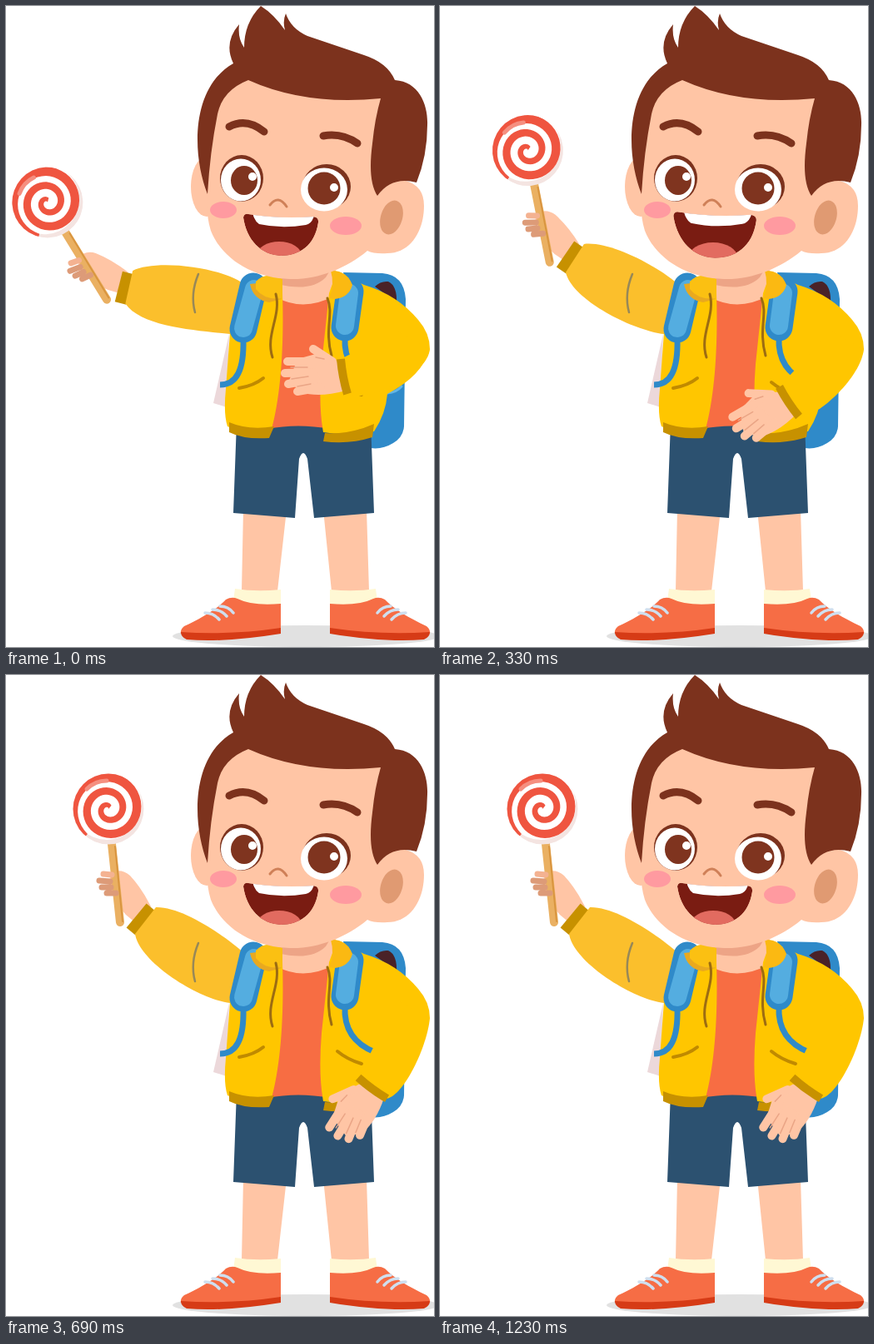
An HTML page for the animation above (1.8 s loop, 514 by 770 pixels).

```html
<!DOCTYPE html>
<html lang="en">
<head>
<meta charset="utf-8">
<title>Boy with a lollipop</title>
<style>
  html, body { margin: 0; height: 100%; overflow: hidden; background: #fff; }
  svg { display: block; width: 100%; height: 100%; }
  .line { fill: none; stroke-linecap: round; stroke-linejoin: round; }
  .flat { stroke-linecap: butt; }
  .skin { fill: #ffc5a5; }
  .hair { fill: #7c321d; }
  .coat { fill: #ffc600; }
  .trim { fill: #c79100; }
  .blue { fill: #2f8ac9; }
</style>
</head>
<body>
<svg viewBox="0 0 514 770">
  <defs>
    <clipPath id="mouthClip"><path id="lips" d="M285 254Q286 249 291 250Q330 256 369 253Q376 254 375 260C371 288 352 300 330 300C306 299 289 281 285 254Z"/></clipPath>
    <clipPath id="candyClip"><circle cx="123" cy="161" r="42.5"/></clipPath>
    <g id="shoe">
      <path fill="#fff8d4" d="M275 700Q300 704 330 701V722H272Z"/>
      <path fill="#f66d45" d="M330 718V751Q270 760 210 754Q209 749 214 745C235 735 254 724 264 713Q271 709 278 712Q296 721 330 718Z"/>
      <path fill="#d63b16" d="M210 752Q270 756 330 747V754Q262 765 217 761Q210 758 210 752Z"/>
      <path class="line" stroke="#cfdfef" stroke-width="3.5" d="M239 729Q249 729 256 737M248 725Q258 725 265 733M257 721Q267 721 273 729"/>
    </g>
  </defs>

  <ellipse cx="360" cy="757" rx="160" ry="13" fill="#e1e1e1"/>

  <!-- backpack -->
  <path class="blue" d="M405 320L452 321Q478 323 480 352L478 505Q477 518 465 525Q452 533 438 531L425 400Z"/>
  <path fill="#4a2228" d="M443 337Q450 330 459 331Q470 336 469 357Q456 346 443 337Z"/>
  <path class="line" stroke="#62b5e5" stroke-width="3" d="M458 465Q469 464 475 457"/>
  <path fill="#ecd8da" d="M268 394L249 477L265 482Z"/>

  <!-- legs -->
  <path class="skin" d="M285 605L283 703H326L337 605ZM381 605L391 703H436L433 605Z"/>
  <use href="#shoe"/>
  <use href="#shoe" transform="matrix(-1 0 0 1 719 0)"/>
  <path fill="#2c5170" d="M277 500H438L442 609L370 615L362 544Q357 530 352 544L347 615L273 609Z"/>

  <!-- raised arm -->
  <g id="arm">
    <path class="skin" d="M174 278Q163 256 149 241Q139 232 127 237Q121 250 128 263Q137 284 150 293L158 300Z"/>
    <path class="line" stroke="#eab062" stroke-width="10" d="M127 203L137 297"/>
    <path class="line" stroke="#d9953f" stroke-width="2" d="M131 206L140 296"/>
    <path class="line" stroke="#f4b291" stroke-width="7" d="M117 239L127 240"/>
    <path class="line" stroke="#dd9b78" stroke-width="7" d="M112 247L125 248M115 255L126 255M121 262L132 262"/>
    <g clip-path="url(#candyClip)">
      <circle cx="123" cy="161" r="43" fill="#f4e4e1"/>
      <circle cx="121" cy="156" r="42" fill="#fff"/>
      <path id="swirl" fill="#ef5540"/>
      <path class="line" stroke="#f58f80" stroke-width="5" d="M97 137Q107 127 121 127"/>
    </g>
    <path class="line flat" stroke="#c79100" stroke-width="14" d="M174 279L150 308"/>
  </g>
  <path id="sleeve" fill="#fbbf2c"/>
  <path class="line" stroke="#978858" stroke-width="2.5" d="M231 322Q221 346 227 368"/>

  <!-- torso -->
  <path class="skin" d="M316 316H396V352Q358 370 322 354Z"/>
  <path fill="#eda486" d="M318 326Q355 330 390 316L384 326Q366 344 326 334Z"/>
  <path fill="#f76d43" d="M325 350Q358 368 394 348L390 508Q350 501 314 508Z"/>
  <path class="coat" d="M298 326L332 345C334 410 330 470 318 512Q290 516 266 505Q261 490 264 460L269 392L286 334Z"/>
  <path class="trim" d="M268 500Q291 510 322 505L316 519Q286 521 268 512Z"/>
  <path class="coat" d="M388 345L397 320L430 335Q470 347 495 377Q509 393 509 412Q500 444 458 466Q456 490 442 511Q410 517 381 512Q375 480 379 430Z"/>
  <path class="trim" d="M383 513Q413 515 442 502L440 518Q412 527 381 523Z"/>
  <path class="line" stroke="#c08a00" stroke-width="4" d="M280 459Q298 456 309 447M398 452Q410 462 427 467"/>

  <!-- straps -->
  <path class="line" stroke="#2f8ac9" stroke-width="33" d="M297 337L285 388M413 343L407 386"/>
  <path class="line" stroke="#54ade0" stroke-width="22" d="M298 340L285 387M412 345L407 384"/>
  <path class="line flat" stroke="#2f8ac9" stroke-width="7" d="M285 400C286 437 277 455 257 455M407 398Q405 438 443 453"/>
  <path fill="#e9a91f" d="M293 334Q297 353 316 356L331 352L310 332Z"/>
  <path fill="#fbc012" d="M300 331Q312 318 332 328V351Q311 354 300 340Z"/>
  <path fill="#fbb912" d="M388 351Q395 335 390 318Q409 317 416 335Q412 350 395 352Z"/>
  <path class="line" stroke="#9c6c12" stroke-width="3" d="M324 346C331 372 311 395 320 422M386 351C394 370 382 388 391 420"/>

  <!-- head -->
  <ellipse class="skin" cx="241" cy="217" rx="19" ry="36"/>
  <path class="skin" d="M502 240C502 270 486 297 458 297Q442 298 434 294C408 316 373 329 341 328C298 327 260 305 246 270Q238 245 243 205L250 120L290 82L455 106L446 222Q462 207 480 210Q502 216 502 240Z"/>
  <ellipse cx="463" cy="254" rx="13" ry="21" fill="#e09a72" transform="rotate(17 463 254)"/>
  <path class="hair" d="M242 226C223 178 222 98 273 69Q261 44 280 22Q278 39 286 50Q286 20 306 0Q322 10 335 29Q332 18 336 9Q342 27 362 36L430 59Q458 68 467 89C497 91 507 120 506 143Q506 180 493 212Q463 204 446 228Q434 210 440 165Q443 135 450 111Q360 120 291 89Q260 101 254 130Q245 175 242 226Z"/>
  <path class="line" stroke="#7c321d" stroke-width="9" d="M268 145Q289 134 310 151M381 156Q403 152 422 165"/>
  <ellipse class="hair" cx="283" cy="207" rx="26" ry="28"/>
  <ellipse class="hair" cx="385" cy="217" rx="29" ry="27"/>
  <ellipse cx="282" cy="209" rx="24" ry="25.5" fill="#fff"/>
  <ellipse cx="382" cy="220.5" rx="28" ry="26" fill="#fff"/>
  <ellipse cx="286" cy="209.5" rx="16" ry="17.5" fill="#7f341f"/>
  <circle cx="382" cy="219" r="19.5" fill="#7f341f"/>
  <path fill="#fff" d="M291 205a5 5 0 1 0 10 0a5 5 0 1 0-10 0M389 218a5 5 0 1 0 10 0a5 5 0 1 0-10 0"/>
  <path class="line" stroke="#cf8058" stroke-width="3" d="M317 239Q327 226 337 241"/>
  <ellipse cx="261" cy="245" rx="16" ry="10" fill="#ff9aa0"/>
  <ellipse cx="408" cy="264" rx="19" ry="11" fill="#ff9aa0"/>
  <g id="mouth">
    <g clip-path="url(#mouthClip)">
      <use href="#lips" fill="#7a1c12"/>
      <ellipse cx="328" cy="300" rx="27" ry="17" fill="#e26b60"/>
      <path fill="#fff" d="M296 248L370 252Q367 262 360 263Q331 268 304 262Q298 258 296 248Z"/>
    </g>
  </g>

  <!-- bent arm -->
  <path id="forearm" class="coat"/>
  <g id="lowerArm">
    <g id="hand">
      <path class="skin" d="M401 429Q386 420 372 418L350 424L340 450L354 464Q376 471 408 462Z"/>
      <path class="line" stroke="#ffc5a5" stroke-width="10" d="M369 412L392 427M338 427L375 427M335 441L370 440M339 454L372 448M350 463L378 458"/>
      <path class="line" stroke="#eaa586" stroke-width="1.5" d="M342 434L362 434M343 448L363 445M350 457L366 454M372 422L382 424"/>
    </g>
    <path class="line flat" stroke="#c79100" stroke-width="10" d="M402 424Q404 446 410 466"/>
  </g>
</svg>
<script>
const byId = id => document.getElementById(id);
const LOOP = 1800, STEP = 30;
const SHOULDER = [252, 360], ELBOW = [488, 427], WRIST = [405, 445];

const ramp = (t, from, to) => Math.min(1, Math.max(0, (t - from) / (to - from)));

// Mouth size over time: [ms, scale]
const mouthKeys = [[0, 1], [255, 1.18], [465, .925], [690, 1], [900, 1], [1080, .94], [1230, 1], [LOOP, 1]];

function mouthScale(t) {
  const i = mouthKeys.findIndex(key => key[0] > t);
  const [t0, a] = mouthKeys[i - 1], [t1, b] = mouthKeys[i];
  const p = ramp(t, t0, t1);
  return a + (b - a) * p * p * (3 - 2 * p);
}

// Returns a function giving a point turned about a pivot, as path text
function turner([px, py], degrees) {
  const a = degrees * Math.PI / 180, c = Math.cos(a), s = Math.sin(a);
  return (x, y) => `${px + (x - px) * c - (y - py) * s} ${py + (x - px) * s + (y - py) * c}`;
}

const turn = (id, degrees, pivot) =>
  byId(id).setAttribute('transform', `rotate(${degrees} ${pivot})`);

// A spiral band that narrows towards the centre
function drawSwirl() {
  const outer = [], inner = [], turns = 2.5;
  for (let i = 0; i <= 100; i++) {
    const p = i / 100, a = (130 + 360 * turns * p) * Math.PI / 180;
    const r = 45 - 17 * turns * p, half = 6 - 3 * p;
    const at = radius => `${123 + radius * Math.cos(a)} ${161 + radius * Math.sin(a)}`;
    outer.push(at(r + half));
    inner.unshift(at(r - half));
  }
  byId('swirl').setAttribute('d', 'M' + outer.concat(inner).join('L') + 'Z');
}

function draw(now) {
  const t = Math.floor(now % LOOP / STEP) * STEP;

  const lift = 25.5 * (ramp(t, 0, 415) - 1);
  const L = turner(SHOULDER, lift);
  turn('arm', lift, SHOULDER);
  byId('sleeve').setAttribute('d',
    `M288 336C264 314 ${L(212, 278)} ${L(180, 279)}L${L(155, 311)}C${L(160, 345)} 232 390 269 394Z`);

  const drop = -43 * ramp(t, 30, 600);
  const R = turner(ELBOW, drop);
  turn('lowerArm', drop, ELBOW);
  turn('hand', drop / 3, WRIST);
  byId('forearm').setAttribute('d',
    `M509 412C506 446 ${R(428, 477)} ${R(410, 466)}L${R(402, 424)}L470 390Z`);

  byId('mouth').setAttribute('transform',
    `translate(330 274) scale(${mouthScale(t)}) translate(-330 -274)`);
  requestAnimationFrame(draw);
}

drawSwirl();
draw(0);
</script>
</body>
</html>
```
